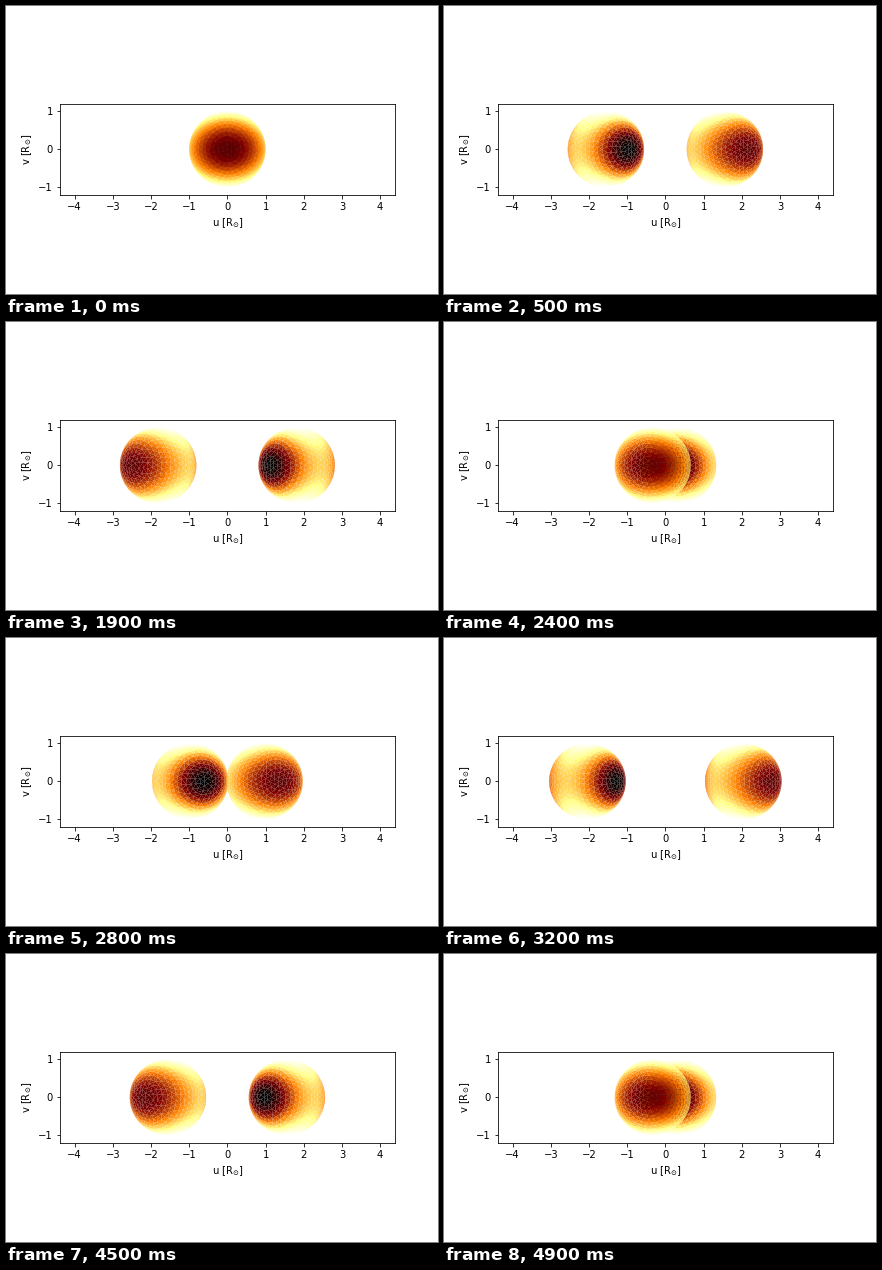
A matplotlib script for the animation above (5 s loop, 432 by 288 pixels).

```python
import numpy as np
import matplotlib.pyplot as plt
from matplotlib.animation import FuncAnimation
from matplotlib.collections import PolyCollection
from matplotlib.tri import Triangulation

FRAMES = 50
SMA = 5.3            # separation in solar radii, equal masses
POLE = 0.9922 / SMA  # polar radius in units of the separation
SPACING = 0.139      # edge length of a mesh triangle on the unit sphere
TO_COMPANION = np.array([1.0, 0.0, 0.0])

plt.rcParams.update({"font.family": "DejaVu Sans", "font.size": 10})


def unit_mesh():
    """Staggered rings around the x axis, joined by a spherical Delaunay mesh."""
    rng = np.random.default_rng(4)
    rings = round(np.pi / (SPACING * np.sqrt(3) / 2))
    polar, azimuth = [0.0], [0.0]
    for k in range(1, rings):
        theta = np.pi * k / rings
        count = max(6, round(2 * np.pi * np.sin(theta) / SPACING))
        phi = 2 * np.pi * (np.arange(count) + 0.5 * (k % 2)) / count
        wobble = 0.1 * SPACING * rng.uniform(-1, 1, (2, count))
        polar.extend(theta + wobble[0])
        azimuth.extend(phi + wobble[1] / np.sin(theta))
    polar, azimuth = np.array(polar), np.array(azimuth)

    flat = np.tan(polar / 2)
    tri = Triangulation(flat * np.cos(azimuth), flat * np.sin(azimuth))
    faces = tri.triangles.tolist()
    for face, side in np.argwhere(tri.neighbors == -1):
        corners = tri.triangles[face]
        faces.append([corners[side], corners[(side + 1) % 3], len(polar)])

    points = np.column_stack([np.cos(polar),
                              np.sin(polar) * np.cos(azimuth),
                              np.sin(polar) * np.sin(azimuth)])
    return np.vstack([points, -TO_COMPANION]), np.array(faces)


def potential(p):
    r = np.linalg.norm(p, axis=-1)
    s = np.linalg.norm(p - TO_COMPANION, axis=-1)
    return 1 / r + 1 / s - p[..., 0] + p[..., 0]**2 + p[..., 1]**2


def gravity(p):
    r = np.linalg.norm(p, axis=-1, keepdims=True)
    away = p - TO_COMPANION
    s = np.linalg.norm(away, axis=-1, keepdims=True)
    return -p / r**3 - away / s**3 - TO_COMPANION + 2 * p * [1, 1, 0]


def roche_surface(directions):
    level = potential(np.array([0, 0, POLE]))
    r = np.full(len(directions), POLE)
    for _ in range(8):
        p = directions * r[:, None]
        slope = np.sum(gravity(p) * directions, axis=1)
        r -= (potential(p) - level) / slope
    return directions * r[:, None]


directions, faces = unit_mesh()
surface = roche_surface(directions)
triangles = surface[faces] * SMA
centres = roche_surface(
    (c := directions[faces].mean(axis=1)) / np.linalg.norm(c, axis=1)[:, None])
teff = np.linalg.norm(gravity(centres), axis=1)**0.08
colors = plt.get_cmap("afmhot")((teff - teff.min()) / np.ptp(teff))
normals = np.cross(triangles[:, 1] - triangles[:, 0],
                   triangles[:, 2] - triangles[:, 0])
normals *= np.sign(np.sum(normals * centres, axis=1))[:, None]


def visible_star(theta):
    """Projected triangles that face the viewer, with their colours."""
    du, dw = -np.sin(theta), -np.cos(theta)
    facing = normals[:, 0] * dw - normals[:, 1] * du > 0
    x, y, z = np.moveaxis(triangles[facing], -1, 0)
    u = -du * SMA / 2 + x * du + y * dw
    return np.stack([u, z], axis=-1), colors[facing]


fig, ax = plt.subplots(figsize=(6, 4), dpi=72)
fig.subplots_adjust(left=0.125, right=0.9, bottom=0.125, top=0.88)
ax.set_aspect("equal")
ax.set(xlim=(-4.385, 4.385), ylim=(-1.19, 1.19),
       xticks=range(-4, 5), yticks=(-1, 0, 1),
       xlabel=r"u [$\mathrm{R_{\odot}}$]", ylabel=r"v [$\mathrm{R_{\odot}}$]")
mesh = PolyCollection([], edgecolors="none", linewidths=0)
ax.add_collection(mesh, autolim=False)


def draw(frame):
    theta = 2 * np.pi * frame / FRAMES
    far_first = sorted((theta, theta + np.pi), key=np.cos)
    verts, shades = zip(*map(visible_star, far_first))
    mesh.set_verts(np.concatenate(verts))
    mesh.set_facecolor(np.concatenate(shades))
    return mesh,


anim = FuncAnimation(fig, draw, frames=FRAMES, interval=100, repeat=True)
plt.show()
```
